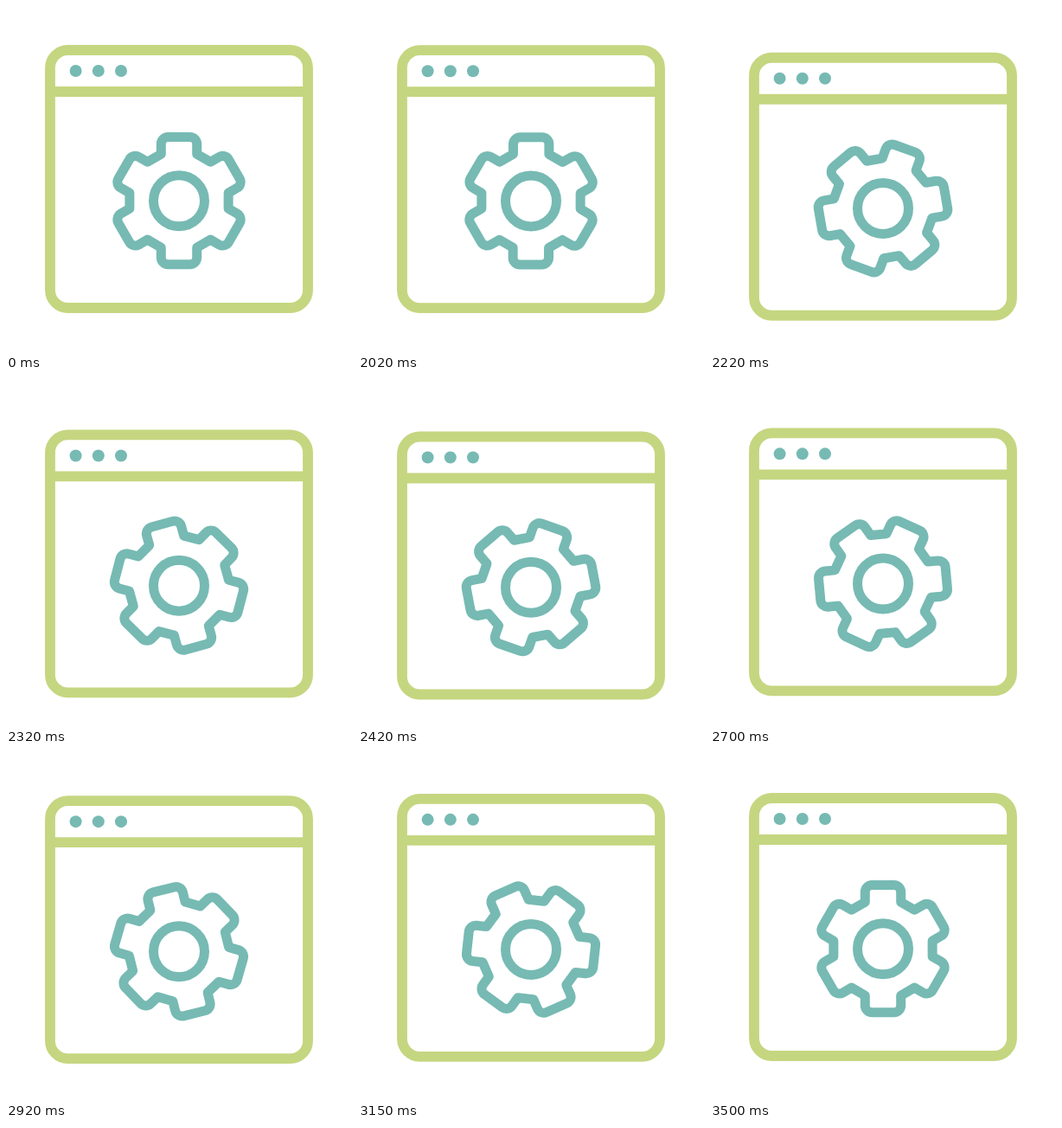
An HTML page that plays this animation: 400 by 400 pixels, repeating every 3.52 s.

```html
<!DOCTYPE html>
<html lang="en">
<head>
<meta charset="utf-8">
<title>Browser window with turning gear</title>
<style>
  html, body { margin: 0; width: 100%; height: 100%; overflow: hidden; background: #fff; }
  svg { display: block; width: 100vw; height: 100vh; }
</style>
</head>
<body>
<svg viewBox="0 0 400 400">
  <g id="win">
    <g fill="none" stroke="#c5d680" stroke-width="11.8">
      <rect x="51" y="51" width="298" height="298" rx="20.5"/>
      <path d="M51 99H349"/>
    </g>
    <g fill="#76bab3">
      <circle cx="80.6" cy="75" r="7"/>
      <circle cx="106.8" cy="75" r="7"/>
      <circle cx="133" cy="75" r="7"/>
    </g>
    <g transform="translate(200 225.2)" fill="none" stroke="#76bab3" stroke-width="11" stroke-linejoin="round">
      <circle r="29.5"/>
      <path id="gear"/>
    </g>
  </g>
</svg>
<script>
const LOOP = 3520, START = 2000, LOW = 2500, END = 3500, DROP = 15;
const win = document.getElementById('win');
const gear = document.getElementById('gear');

function gearPath(teeth, half, foot, top, r) {
  let d = '';
  for (let i = 0; i < teeth; i++) {
    const a = i * 2 * Math.PI / teeth, c = Math.cos(a), s = Math.sin(a);
    const at = (x, y) => `${(x * c - y * s).toFixed(2)} ${(x * s + y * c).toFixed(2)}`;
    const arc = `A${r} ${r} 0 0 1 `;
    d += (i ? 'L' : 'M') + at(-half, -foot) +
      'L' + at(-half, r - top) + arc + at(r - half, -top) +
      'L' + at(half - r, -top) + arc + at(half, r - top) +
      'L' + at(half, -foot);
  }
  return d + 'Z';
}

// Cubic easing with flat ends; x1 and x2 are the handle positions in time.
function ease(x1, x2) {
  return x => {
    if (x <= 0) return 0;
    if (x >= 1) return 1;
    let lo = 0, hi = 1;
    for (let i = 0; i < 30; i++) {
      const s = (lo + hi) / 2, q = 1 - s;
      if (3 * q * q * s * x1 + 3 * q * s * s * x2 + s * s * s < x) lo = s;
      else hi = s;
    }
    return lo * lo * (3 - 2 * lo);
  };
}

const sink = ease(0.21, 0.49);
const rise = ease(0.33, 0.02);
const spin = ease(0.385, 0.43);
const part = (t, a, b) => (t - a) / (b - a);

function draw(t) {
  const y = DROP * (sink(part(t, START, LOW)) - rise(part(t, LOW, END)));
  win.setAttribute('transform', `translate(0 ${y.toFixed(3)})`);
  gear.setAttribute('transform', `rotate(${(360 * spin(part(t, START, END))).toFixed(3)})`);
}

gear.setAttribute('d', gearPath(6, 20.7, 54, 73.6, 8));
const begin = performance.now();
function tick() {
  draw((performance.now() - begin) % LOOP);
  requestAnimationFrame(tick);
}
draw(0);
requestAnimationFrame(tick);
</script>
</body>
</html>
```
